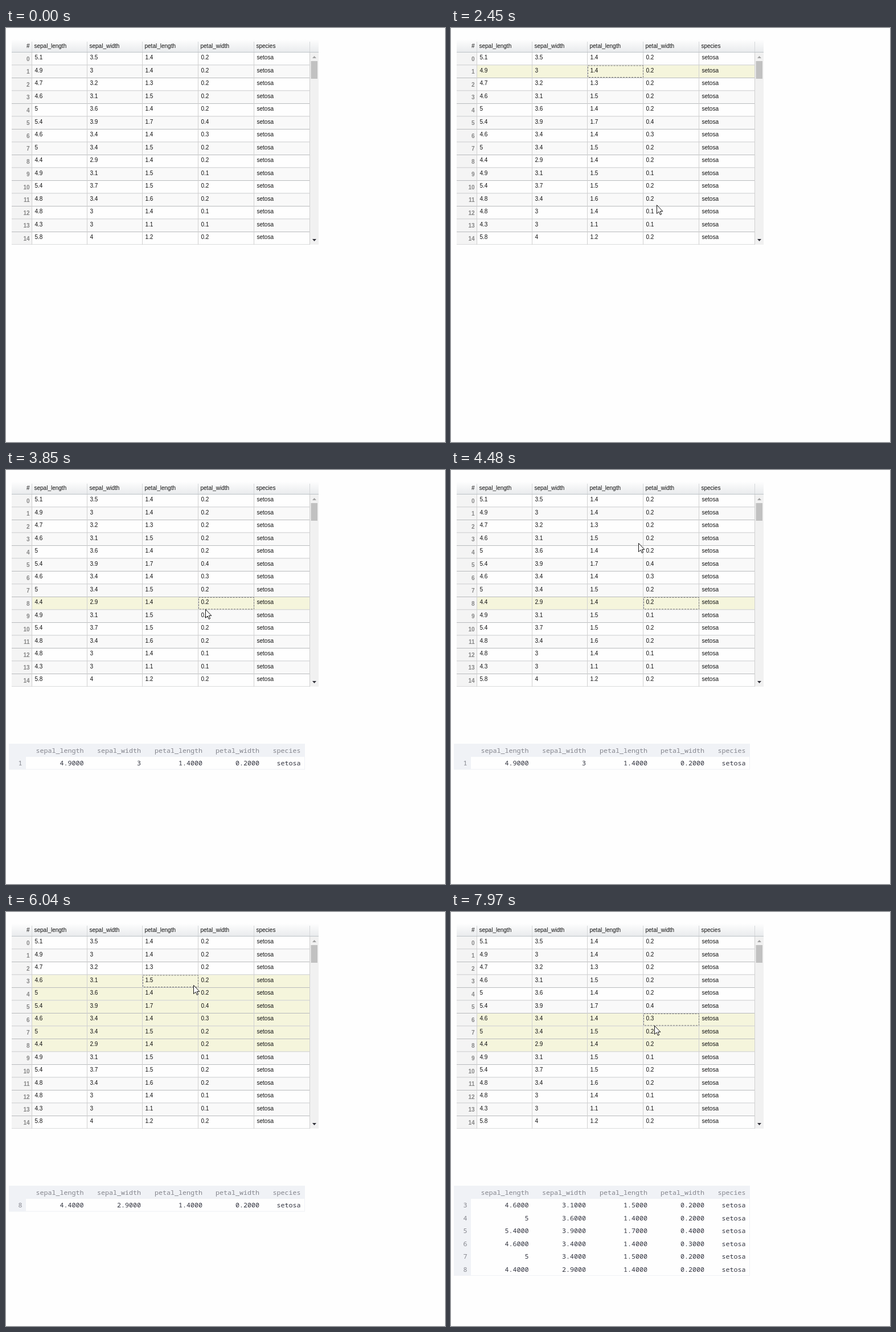
Write an HTML page that moves like this. It is 771 px wide and 726 px high and loops after 8 s.

```html
<!DOCTYPE html>
<html lang="en">
<head>
<meta charset="utf-8">
<title>Row selection in a data grid</title>
<style>
  html, body { margin: 0; width: 100%; height: 100%; overflow: hidden; background: #fefefe; }
  svg { display: block; width: 100vw; height: 100vh; }
  #grid { font: 10px "Liberation Sans", Arial, sans-serif; fill: #111; }
  #result { font: 11.67px "Noto Sans Mono", "DejaVu Sans Mono", monospace; fill: #31333f; text-anchor: end; }
  .num { font-weight: bold; fill: #858585; text-anchor: end; }
  .soft { fill: #83848c; }
</style>
</head>
<body>
<svg viewBox="0 0 771 726">
  <defs>
    <linearGradient id="head" x2="0" y2="1">
      <stop stop-color="#fefefe"/><stop offset="1" stop-color="#e9ebed"/>
    </linearGradient>
    <clipPath id="view"><path d="M0 0H771V380H0Z"/></clipPath>
  </defs>
  <g id="grid" clip-path="url(#view)"></g>
  <g id="result"></g>
  <circle id="press" r="10.5" fill="#000" fill-opacity=".4"/>
  <path id="cursor" d="M.5 .5V15.5L4 12.2L6.4 17.5L8.6 16.5L6.3 11.4H10.8Z" fill="#fff" stroke="#111"/>
</svg>
<script>
const LOOP = 8000, STEP = 76.7, ROW = 22.5;
const $ = id => document.getElementById(id);
const grid = $('grid'), result = $('result'), press = $('press'), cursor = $('cursor');

const names = ['sepal_length', 'sepal_width', 'petal_length', 'petal_width', 'species'];
const data = `5.1 3.5 1.4 .2|4.9 3 1.4 .2|4.7 3.2 1.3 .2|4.6 3.1 1.5 .2|5 3.6 1.4 .2
|5.4 3.9 1.7 .4|4.6 3.4 1.4 .3|5 3.4 1.5 .2|4.4 2.9 1.4 .2|4.9 3.1 1.5 .1|5.4 3.7 1.5 .2
|4.8 3.4 1.6 .2|4.8 3 1.4 .1|4.3 3 1.1 .1|5.8 4 1.2 .2`
  .split('|').map(row => row.trim().split(' ').map(Number).concat('setosa'));

const edges = [45, 142, 239, 337, 435, 533];
const rights = [136.5, 237, 345, 445, 517.5];
const rowTop = i => 43 + ROW * i;

function add(parent, tag, attrs, content = '') {
  const el = document.createElementNS('http://www.w3.org/2000/svg', tag);
  for (const key in attrs) el.setAttribute(key, attrs[key]);
  el.textContent = content;
  return parent.appendChild(el);
}
const box = (parent, x, y, width, height, fill) => add(parent, 'rect', {x, y, width, height, fill});
const label = (parent, x, y, content, cls = '') =>
  add(parent, 'text', {x, y: Math.floor(y), class: cls}, content);

// Main grid
box(grid, 10, 20, 539, 22, 'url(#head)');
label(grid, 41.5, 35, '#').setAttribute('text-anchor', 'end');
names.forEach((name, c) => label(grid, edges[c] + 4.5, 35, name));
const stripes = data.map((row, i) => {
  const top = rowTop(i);
  box(grid, 10, top, 35, ROW - 1, '#f4f4f4');
  const stripe = box(grid, 46, top, 488, ROW - 1, '#fff');
  box(grid, 10, top + ROW - 1, 524, 1, '#b9bbbd');
  label(grid, 41.5, top + 15, i, 'num');
  row.forEach((value, c) => label(grid, edges[c] + 5.5, top + 12.5, value));
  return stripe;
});
box(grid, 10, 42, 539, 1, '#bdc3c7');
edges.forEach(x => {
  box(grid, x, 24, 1, 18, '#d5d7d9');
  box(grid, x, 43, 1, 337, '#d0d0d0');
});
box(grid, 534, 43, 15, 337, '#f1f1f1');
box(grid, 535.5, 58, 11.5, 31, '#c1c1c1');
add(grid, 'path', {d: 'M538 53h7l-3.5-4z', fill: '#a3a3a3'});
add(grid, 'path', {d: 'M538 370h7l-3.5 4z', fill: '#303038'});
const focus = add(grid, 'rect', {fill: 'none', stroke: '#777', 'stroke-dasharray': '3 2', height: ROW - 2});

// Each click selects rows first..last on release; the result follows when shown
const idle = {down: -1, up: -1, first: -1, last: -1, shown: -1};
const clicks = [
  {down: 1770, up: 1910, first: 1, last: 1, col: 2, shown: 3380},
  {down: 3700, up: 3850, first: 8, last: 8, col: 3, shown: 5090},
  {down: 5870, up: 6040, first: 3, last: 8, col: 2, shown: 7260},
  {down: 7570, up: 7670, first: 6, last: 8, col: 3, shown: Infinity},
];
// Pointer curves: each starts where the one before ended
const moves = [
  {start: 210, steps: 4, bend: [400, 360], end: [327, 260]},
  {start: 760, steps: 10, bend: [267, 95], end: [285, 86]},
  {start: 1990, steps: 7, bend: [305, 190], end: [361, 310]},
  {start: 2690, steps: 8, bend: [356, 270], end: [350, 244]},
  {start: 4020, steps: 7, bend: [308, 272], end: [329, 128]},
  {start: 6570, steps: 7, bend: [345, 155], end: [355, 183]},
  {start: 7890, steps: 2, bend: [356, 191], end: [357, 199]},
];
moves.forEach((move, i) => move.from = i ? moves[i - 1].end : [701, 844]);

const latest = (list, key, t) => list.filter(item => item[key] <= t).pop();

function pointer(t) {
  const move = latest(moves, 'start', t);
  if (!move) return null;
  const {start, steps, from, bend, end} = move;
  const p = Math.min(1, (Math.floor((t - start + 2) / STEP) + 1) / steps);
  const u = p * p * (3 - 2 * p), v = 1 - u;
  return from.map((a, k) => Math.round(v * v * a + 2 * u * v * bend[k] + u * u * end[k]));
}

// Stale content dims slowly and recovers at once, the grid a little before the result
function opacity(t, lead) {
  const click = clicks.find(c => t >= c.up + 660 && t < c.shown - lead);
  return click ? 1 - 0.67 * ((t - click.up - 660) / 1000) ** 1.7 : 1;
}

function showSelection({first, last, col}) {
  stripes.forEach((stripe, i) => stripe.setAttribute('fill',
    i >= first && i <= last ? '#f5f5dc' : i % 2 ? '#f9f9f9' : '#fefefe'));
  focus.style.display = first < 0 ? 'none' : '';
  if (first < 0) return;
  focus.setAttribute('x', edges[col] + 1.5);
  focus.setAttribute('y', rowTop(first) + .5);
  focus.setAttribute('width', edges[col + 1] - edges[col] - 1);
}

function showResult({first, last}) {
  result.replaceChildren();
  if (first < 0) return;
  const height = 23 + ROW * (last - first + 1);
  box(result, 5, 480, 520, height, '#f0f2f6');
  box(result, 35, 503, 489, height - 24, '#fefefe');
  names.forEach((name, c) => label(result, rights[c], 496, name, 'soft'));
  for (let i = first; i <= last; i++) {
    const y = 518.5 + ROW * (i - first);
    label(result, 28.5, y, i, 'soft');
    data[i].forEach((value, c) => label(result, rights[c], y,
      value === 'setosa' || Number.isInteger(value) ? value : value.toFixed(4)));
  }
}

let selected, shown;
function draw(now) {
  const t = now % LOOP;
  const selection = latest(clicks, 'up', t) || idle;
  const output = latest(clicks, 'shown', t) || idle;
  if (selection !== selected) showSelection(selected = selection);
  if (output !== shown) showResult(shown = output);
  grid.setAttribute('opacity', opacity(t, 220));
  result.setAttribute('opacity', opacity(t, 0));

  const tip = pointer(t);
  cursor.style.display = tip ? '' : 'none';
  press.style.display = clicks.some(c => t >= c.down && t < c.up) ? '' : 'none';
  if (tip) {
    cursor.setAttribute('transform', `translate(${tip})`);
    press.setAttribute('transform', `translate(${tip[0] + .5} ${tip[1] + .5})`);
  }
  requestAnimationFrame(draw);
}
draw(0);
</script>
</body>
</html>
```
